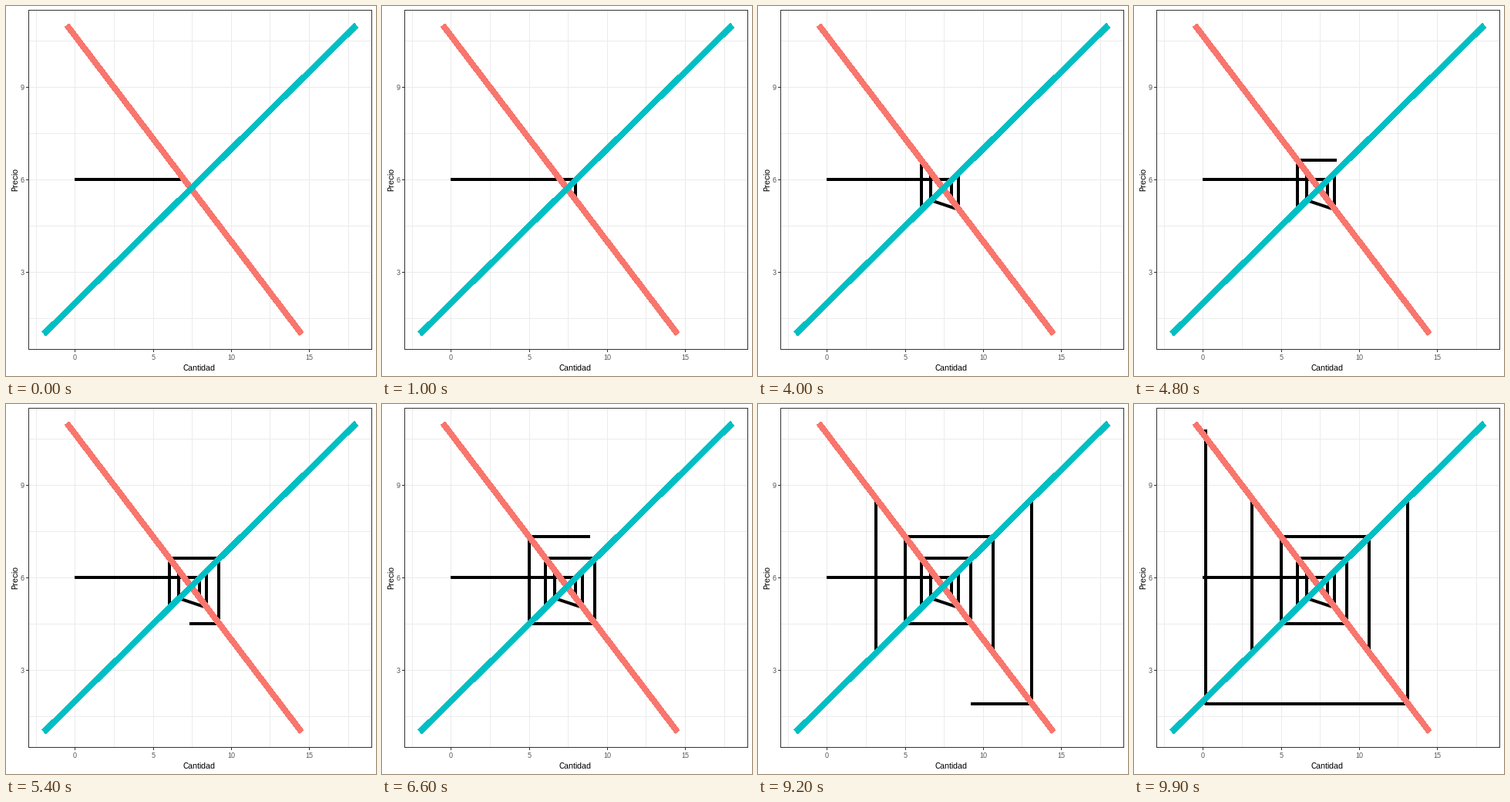
A matplotlib script that plays this animation: 480 by 480 pixels, repeating every 10000 ms.

```python
import numpy as np
import matplotlib.pyplot as plt
from matplotlib.animation import FuncAnimation

SIZE, DPI = 480, 100
FRAMES, STEPS = 100, 10
PX = 72 / DPI  # points per pixel
LEFT, RIGHT, TOP, BOTTOM = 29, 474, 5, 445
GRID, FRAME, TICK = "#EBEBEB", "#333333", "#4D4D4D"

# whole-pixel glyph hinting keeps small text crisp
plt.rcParams.update({"text.hinting": "native", "text.hinting_factor": 1})


def sx(q):
    return np.floor(29.2 + (np.asarray(q) + 3) * 20.24)


def sy(p):
    return np.floor(225.5 - (np.asarray(p) - 6) * 40)


def demand(q):
    return (32 - 2 * q) / 3


def supply(q):
    return 2 + q / 2


def cobweb():
    """Stops of the path as rows of (frame, x, y) in pixels."""
    stops = [(0, 0, 6), (0, 7, 6)]
    q = 8
    for k in range(1, STEPS + 1):
        frame = round(k * (FRAMES - 1) / STEPS)
        ends = [supply(q), demand(q)]
        if k in (2, 3, 8):
            ends.reverse()
        stops += [(frame, abs(q), p) for p in ends]
        q = 2 * (demand(q) - 2)
    f, x, y = np.array(stops).T
    return np.column_stack([f, sx(x), sy(y)])


fig = plt.figure(figsize=(SIZE / DPI, SIZE / DPI), dpi=DPI, facecolor="white")
ax = fig.add_axes([0, 0, 1, 1])
ax.set(xlim=(0, SIZE), ylim=(SIZE, 0))
ax.axis("off")


def line(x, y, color, width, z, smooth=False):
    return ax.plot(x, y, color=color, lw=width * PX, zorder=z, antialiased=smooth,
                   snap=False, solid_capstyle="butt", solid_joinstyle="round")[0]


def hair(x, y, color, z):
    line(np.add(x, 0.5), np.add(y, 0.5), color, 1, z)


def curve(q, p, color, z):
    # aliased slanted strokes fill every touched pixel, so 6.6 shows as 8
    line(sx(q) + 0.25, sy(p) + 0.25, color, 6.6, z)


def label(x, y, text, size, color, **kw):
    ax.text(x, y, text, fontsize=size * PX, color=color, family="Liberation Sans",
            va="baseline", rotation_mode="anchor", **kw)


for q in np.arange(-2.5, 18, 2.5):
    hair([sx(q)] * 2, [TOP, BOTTOM], GRID, 1)
for p in np.arange(1.5, 11, 1.5):
    hair([LEFT, RIGHT], [sy(p)] * 2, GRID, 1)

for q in (0, 5, 10, 15):
    hair([sx(q)] * 2, [BOTTOM, BOTTOM + 3], FRAME, 5)
    label(sx(q), 459, str(q), 9, TICK, ha="center")
for p in (3, 6, 9):
    hair([LEFT - 3, LEFT], [sy(p)] * 2, FRAME, 5)
    label(24, sy(p) + 4, str(p), 9, TICK, ha="right")

label(251, 473, "Cantidad", 11, "black", ha="center")
label(15, 225.5, "Precio", 11, "black", ha="center", rotation=90)

curve([-0.5, 14.5], [11, 1], "#F8766D", 3)
curve([-2, 18], [1, 11], "#00BFC4", 4)
hair([LEFT, RIGHT, RIGHT, LEFT, LEFT], [TOP, TOP, BOTTOM, BOTTOM, TOP], FRAME, 6)

path = cobweb()
trail = line([], [], "black", 4, 2, smooth=True)


def draw(i):
    n = int(np.sum(path[:, 0] <= i))
    pts = path[:n, 1:]
    if n < len(path):
        (f0, *a), (f1, *b) = path[n - 1], path[n]
        t = (i - f0) / (f1 - f0)
        tip = np.floor(np.array(a) + t * np.subtract(b, a))
        if t > 0:
            pts = np.vstack([pts, tip])
    trail.set_data(pts[:, 0], pts[:, 1])
    return (trail,)


anim = FuncAnimation(fig, draw, frames=FRAMES, interval=100, repeat=True,
                     repeat_delay=0, blit=False)
plt.show()
```
